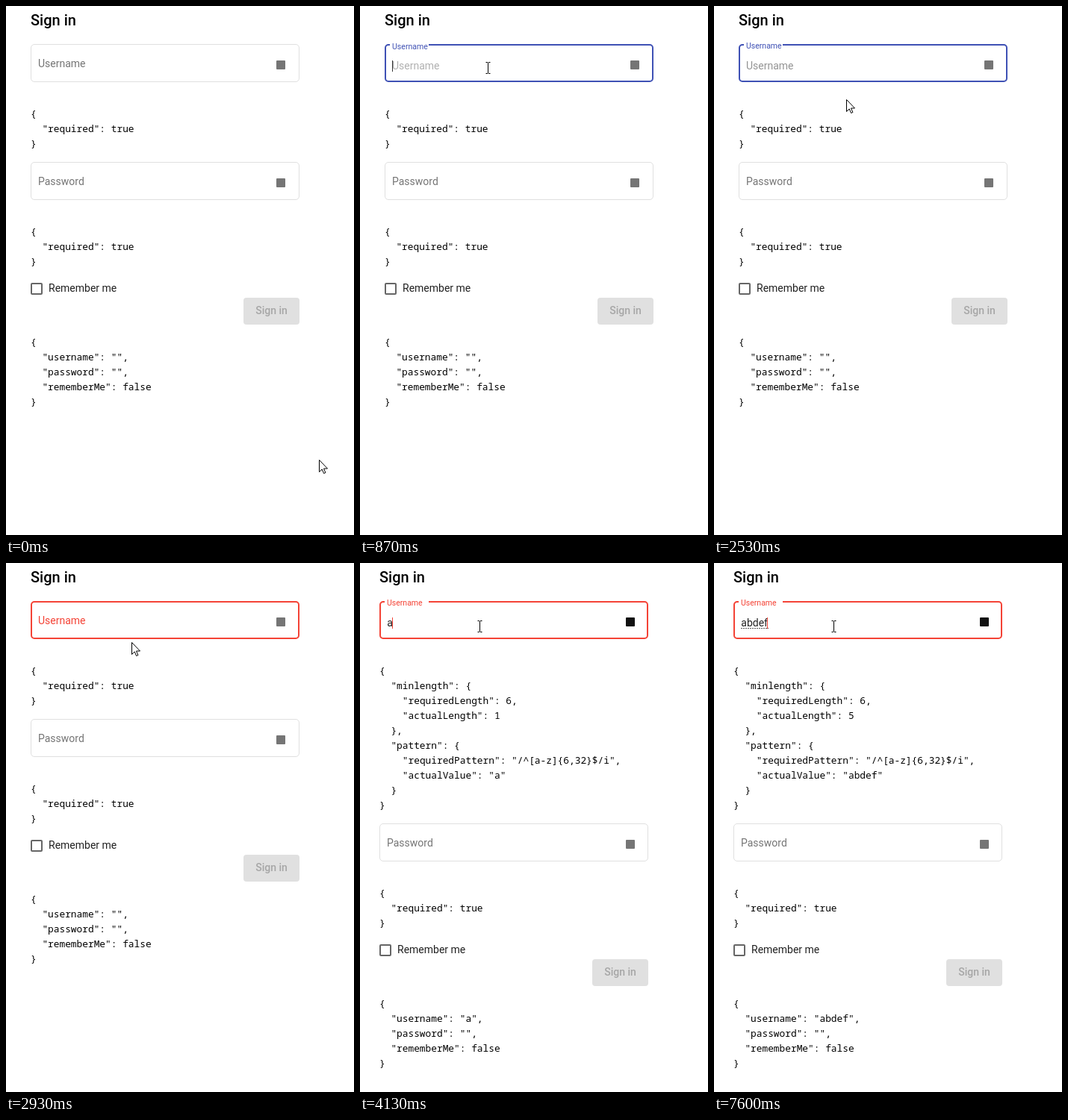
Animation, 466 px wide and 709 px high, one loop 8000 ms. Source, as an HTML page:

```html
<!DOCTYPE html>
<html lang="en">
<head>
<meta charset="utf-8">
<title>Sign in form</title>
<style>
  html, body { margin: 0; width: 100%; height: 100%; overflow: hidden; background: #fff; }
  svg { display: block; width: 466px; height: 709px; }
  text { font: 14px Roboto, sans-serif; fill: #212121; white-space: pre; }
  .title { font-size: 20px; font-weight: 500; fill: #000; }
  .code text { font: 12.83px "Noto Sans Mono", monospace; fill: #000; }
  .hint { fill: #757575; }
  .button { font-weight: 500; fill: #a6a6a6; text-anchor: middle; }
  .line { fill: none; stroke: #e0e0e0; }
</style>
</head>
<body>
<svg viewBox="0 0 466 709">
  <g id="form">
    <text class="title" x="33" y="26">Sign in</text>
    <path id="outline" class="line"/>
    <text id="label">Username</text>
    <text id="placeholder" x="43" y="85">Username</text>
    <text id="value" x="43.3" y="85"></text>
    <path id="spelling" d="M43 87.5h37" fill="none" stroke="#555" stroke-dasharray="2 1"/>
    <rect id="caret" y="73" width="1" height="15"/>
    <rect id="icon" x="362" y="73" width="12" height="12" rx="1"/>
    <g id="errors" class="code"></g>
    <g id="rest">
      <rect class="line" x="33.5" y="209.5" width="359" height="50" rx="4.5"/>
      <text class="hint" x="43" y="240">Password</text>
      <rect id="icon2" x="362" y="231" width="12" height="12" rx="1" fill="#757575"/>
      <g id="errors2" class="code"></g>
      <rect x="34" y="372" width="14" height="14" rx="1" fill="none" stroke="#666" stroke-width="2"/>
      <text x="57" y="383">Remember me</text>
      <rect x="318" y="391" width="75" height="36" rx="4" fill="#e0e0e0"/>
      <text class="button" x="355.5" y="413">Sign in</text>
      <g id="model" class="code"></g>
    </g>
  </g>
  <g id="cursor">
    <path id="arrow" d="M.5 .5V16.5L4.2 12.9L6.6 18.5L8.9 17.5L6.5 12H11.5Z" fill="#fff" stroke="#000"/>
    <path id="beam" d="M-2.5-7.5H0M1-7.5H3.5M.5-7V7M-2.5 7.5H0M1 7.5H3.5" fill="none" stroke="#000"/>
  </g>
</svg>
<script>
const $ = id => document.getElementById(id);
const set = (id, attrs) => {
  for (const key in attrs) $(id).setAttribute(key, attrs[key]);
};
const show = (id, on) => set(id, { visibility: on ? 'visible' : 'hidden' });

// All times are ticks of 1/15 s.
const LOOP = 120;
const FOCUS = 10, BLUR = 39, REFOCUS = 48;
const typed = [[62, 'a'], [65, 'ab'], [69, 'abd'], [90, 'abde'], [97, 'abdef']];
const caretOn = [[10, 17], [25, 34], [48, 56], [62, 77], [85, 105], [113, 120]];
const path = [
  [0, 419, 608], [8, 171, 83], [34, 171, 83], [38, 177, 125],
  [41, 177, 125], [44, 168, 106], [46, 164, 101], [48, 160, 85], [LOOP, 160, 85]
];
const GREY = [117, 117, 117], BLUE = [63, 81, 181], RED = [244, 67, 54];

const clamp = v => Math.min(1, Math.max(0, v));
const lerp = (a, b, p) => a + (b - a) * p;
const easeOut = p => 1 - (1 - clamp(p)) ** 4;
const smooth = p => p * p * (3 - 2 * p);
const mix = (a, b, p) => `rgb(${a.map((v, i) => Math.round(lerp(v, b[i], p)))})`;

function printJson(id, data, y) {
  const lines = JSON.stringify(data, null, 2).split('\n');
  $(id).replaceChildren(...lines.map((line, i) => {
    const row = document.createElementNS('http://www.w3.org/2000/svg', 'text');
    row.textContent = line.trimStart();
    row.setAttribute('x', 33 + 7.7 * line.search(/\S/));
    row.setAttribute('y', y + 20 * i);
    return row;
  }));
}

function cursorAt(n) {
  const i = path.findIndex(point => point[0] > n);
  const [t0, x0, y0] = path[i - 1], [t1, x1, y1] = path[i];
  const p = smooth((n - t0) / (t1 - t0));
  return [Math.round(lerp(x0, x1, p)), Math.round(lerp(y0, y1, p))];
}

function drawOutline(thick, gapEnd, color) {
  const inset = thick ? 1 : 0.5, r = 5 - inset;
  const l = 33 + inset, t = 51 + inset, right = 393 - inset, b = 102 - inset;
  const start = gapEnd || 40;
  const arc = (x, y) => `a${r} ${r} 0 0 1 ${x * r} ${y * r}`;
  set('outline', {
    d: `M${start} ${t}H${right - r}${arc(1, 1)}V${b - r}${arc(-1, 1)}` +
       `H${l + r}${arc(-1, -1)}V${t + r}${arc(1, -1)}H40${gapEnd ? '' : 'Z'}`,
    'stroke-width': thick ? 2 : 1,
    style: `stroke:${color}`
  });
}

function drawField(n, value, hover) {
  const invalid = n >= BLUR, refocused = n >= REFOCUS;
  const focused = n >= FOCUS && !invalid || refocused;
  const since = refocused ? n - REFOCUS + 0.6 : invalid ? n - BLUR + 0.4 : n - FOCUS + 0.7;
  const p = easeOut(since / 6);

  const color = invalid ? mix(RED, RED, 0) : focused ? mix(BLUE, BLUE, 0) : hover ? '#212121' : '#e0e0e0';
  drawOutline(invalid || focused || hover, focused && (value ? 99 : 92), color);

  const up = focused ? p : invalid ? 1 - p : 0;
  const tint = refocused ? mix(RED, RED, 0) : invalid ? mix(BLUE, RED, p) : mix(GREY, BLUE, up);
  set('label', {
    transform: `translate(43 ${lerp(82, 57, up)}) scale(${lerp(1, 0.75, up)})`,
    style: `fill:${tint}`
  });
  set('placeholder', {
    style: `fill:#949494;opacity:${focused && !value ? easeOut((since - 2) / 6) : 0}`
  });

  $('value').textContent = value;
  const width = value ? $('value').getComputedTextLength() : 0;
  set('caret', {
    x: Math.floor(43.3 + width),
    fill: !value || value === 'abde' ? '#333' : '#f44336'
  });
  show('caret', caretOn.some(([from, to]) => n >= from && n < to));
  show('spelling', n >= 114);
  set('icon', { x: value ? 363 : 362, fill: refocused ? '#111' : '#757575' });
  set('icon2', { x: value ? 363 : 362 });
}

function draw(n) {
  const value = typed.reduce((text, [from, next]) => n >= from ? next : text, '');
  const [x, y] = cursorAt(n);
  const inside = x > 33 && x < 393 && y > 51 && y < 102;

  set('form', { transform: `translate(${value ? -7 : 0} 0)` });
  set('rest', { transform: `translate(0 ${value ? 140 : 0})` });
  drawField(n, value, inside);
  printJson('errors', value ? {
    minlength: { requiredLength: 6, actualLength: value.length },
    pattern: { requiredPattern: '/^[a-z]{6,32}$/i', actualValue: value }
  } : { required: true }, 149);
  printJson('model', { username: value, password: '', rememberMe: false }, 455);

  set('cursor', { transform: `translate(${x} ${y})` });
  show('beam', inside);
  show('arrow', !inside);
}

printJson('errors2', { required: true }, 307);
const begin = performance.now();
let last = -1;
function frame() {
  const n = Math.floor((performance.now() - begin + 4) * 0.015) % LOOP;
  if (n !== last) draw(last = n);
  requestAnimationFrame(frame);
}
frame();
</script>
</body>
</html>
```
